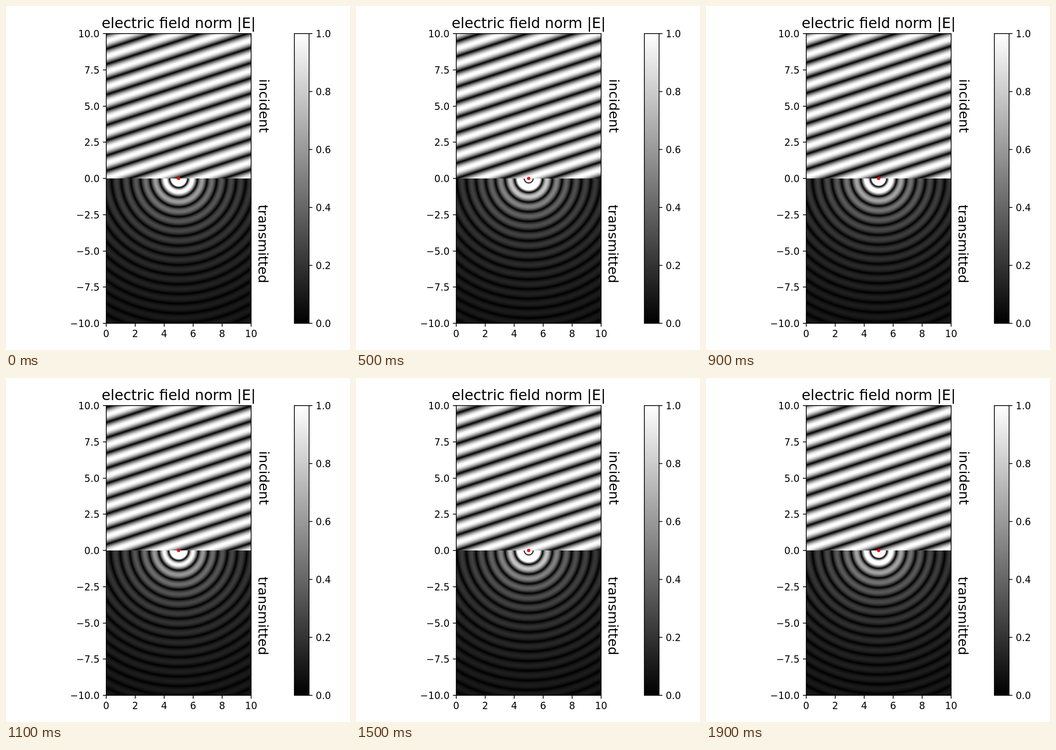
An HTML page with a canvas that plays this animation: 748x748 px, repeating every 2000 ms.

```html
<!DOCTYPE html>
<html lang="en">
<head>
<meta charset="utf-8">
<title>electric field norm |E|</title>
<style>
  html, body { margin: 0; width: 100%; height: 100%; overflow: hidden; background: #fff; }
  canvas { position: absolute; left: 218px; top: 60px; }
  svg { position: absolute; left: 0; top: 0; font: 20.83px "DejaVu Sans", sans-serif; }
  .line { fill: none; stroke: #000; stroke-width: 1.67; }
</style>
</head>
<body>
<canvas id="field" width="315" height="630"></canvas>
<svg id="chart" width="748" height="748" viewBox="0 0 748 748">
  <defs>
    <linearGradient id="gray" x1="0" y1="0" x2="0" y2="1">
      <stop offset="0" stop-color="#fff"/>
      <stop offset="1" stop-color="#000"/>
    </linearGradient>
  </defs>
  <rect class="line" x="218" y="60" width="315" height="630"/>
  <rect class="line" x="627" y="60" width="32" height="630" style="fill: url(#gray)"/>
  <circle cx="375.5" cy="375" r="3.6" fill="#f00"/>
  <text x="375.5" y="47.5" font-size="31.25" text-anchor="middle">electric field norm |E|</text>
  <g font-size="29.17" text-anchor="middle">
    <text transform="translate(551 217.2) rotate(90)">incident</text>
    <text transform="translate(549.3 517.3) rotate(90)">transmitted</text>
  </g>
</svg>
<script>
const SCALE = 31.5;             // pixels per unit length
const FRAME_MS = 100, FRAMES = 20;
const ANGLE = Math.PI / 10;     // angle of incidence
const INDEX = 1.5;              // refractive index of the lower half
const K = Math.PI;              // wave number in the upper half
const SOURCE_X = 5;

const chart = document.getElementById('chart');

function add(tag, attributes, text = '') {
  const node = document.createElementNS('http://www.w3.org/2000/svg', tag);
  for (const name in attributes) node.setAttribute(name, attributes[name]);
  node.textContent = text;
  chart.append(node);
}

function tick(x, y, dx, dy, label, textX, textY, anchor) {
  add('path', { class: 'line', d: `M${x} ${y}l${dx} ${dy}` });
  add('text', { x: textX, y: textY, 'text-anchor': anchor }, label);
}

for (let v = -10; v <= 10; v += 2.5) {
  const y = Math.round(375 - v * SCALE);
  tick(218, y, -7.3, 0, v.toFixed(1).replace('-', '−'), 203.4, y + 7.6, 'end');
}
for (let v = 0; v <= 10; v += 2) {
  const x = 218 + v * SCALE;
  tick(x, 690, 0, 7.3, v, x, 720, 'middle');
}
for (let i = 0; i <= 5; i++) {
  const y = 690 - i * 126;
  tick(659, y, 7.3, 0, (i / 5).toFixed(1), 673.4, y + 7.6, 'start');
}

const canvas = document.getElementById('field');
const context = canvas.getContext('2d');
const image = context.createImageData(canvas.width, canvas.height);
const pixels = new Uint32Array(image.data.buffer);
const kx = K * Math.sin(ANGLE), ky = K * Math.cos(ANGLE);

function fieldNorm(x, y, phase) {
  if (y >= 0) return Math.abs(Math.cos(kx * x - ky * y - phase));
  const r = Math.hypot(x - SOURCE_X, y);
  return Math.min(1, Math.abs(Math.cos(INDEX * K * r + kx * SOURCE_X - phase)) / r);
}

function drawField(phase) {
  let p = 0;
  for (let j = 0; j < canvas.height; j++) {
    const y = 10 - (j + 0.5) / SCALE;
    for (let i = 0; i < canvas.width; i++) {
      const level = Math.round(255 * fieldNorm((i + 0.5) / SCALE, y, phase));
      pixels[p++] = 0xff000000 | level * 0x010101;
    }
  }
  context.putImageData(image, 0, 0);
}

const start = performance.now();
let shown = -1;

function update() {
  const frame = Math.floor((performance.now() - start) / FRAME_MS) % FRAMES;
  if (frame !== shown) drawField(2 * Math.PI * frame / FRAMES);
  shown = frame;
  requestAnimationFrame(update);
}
update();
</script>
</body>
</html>
```
